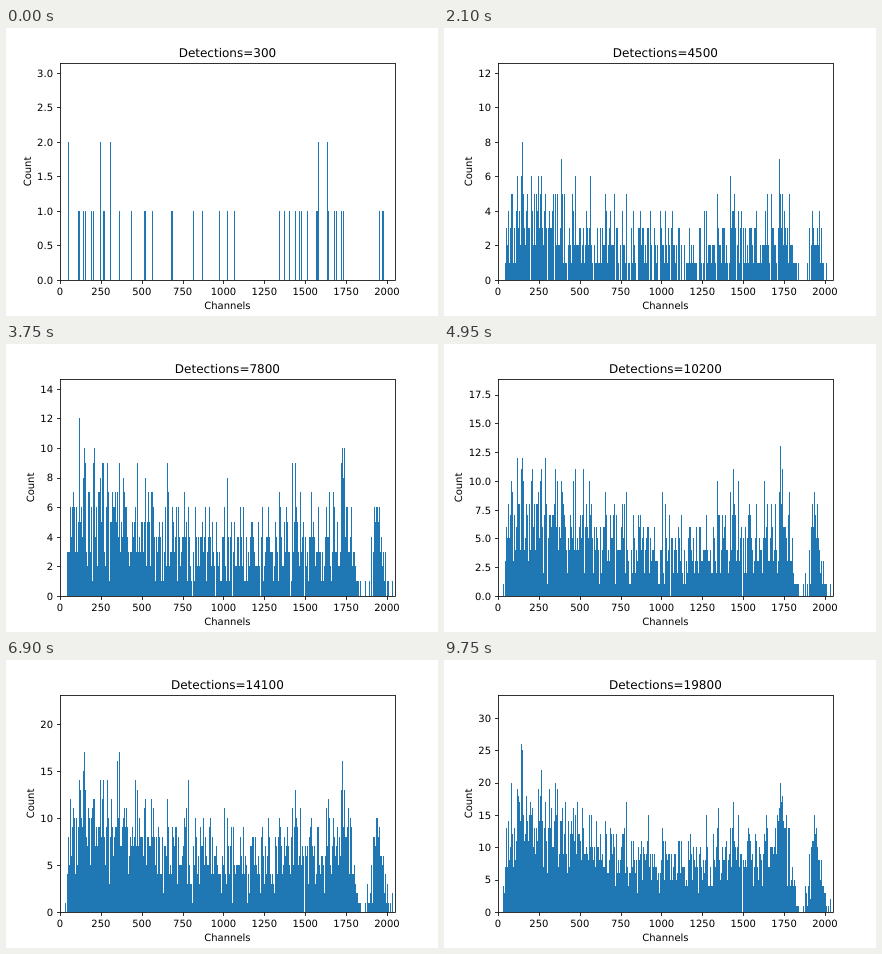
Write an HTML page that moves like this. It is 432 px wide and 288 px high and loops after 9900 ms.

```html
<!DOCTYPE html>
<html lang="en">
<head>
<meta charset="utf-8">
<title>Detections histogram</title>
<style>
  html, body { margin: 0; width: 100%; height: 100%; overflow: hidden; background: #fff; }
  svg { display: block; width: 432px; height: 288px; }
  text { font-family: "DejaVu Sans", sans-serif; font-size: 10px; text-rendering: geometricPrecision; }
  .mid { text-anchor: middle; }
  .end { text-anchor: end; }
  .line { fill: none; stroke: #000; stroke-width: .8; }
</style>
</head>
<body>
<svg viewBox="0 0 432 288">
  <rect width="432" height="288" fill="#fff"/>
  <path id="bars" fill="#1f77b4" shape-rendering="crispEdges"/>
  <rect class="line" x="54.5" y="35.5" width="335" height="217"/>
  <path id="ticks" class="line"/>
  <g id="xLabels"></g>
  <g id="yLabels"></g>
  <text class="mid" x="221.4" y="281">Channels</text>
  <text id="count" class="mid">Count</text>
  <text id="title" class="mid" x="221.4" y="29" style="font-size:12px"></text>
</svg>
<script>
const STEP = 150, STEPS = 66, BATCH = 300;
const LEFT = 54, COLUMNS = 335, WIDTH = 334.8, BASE = 252, HEIGHT = 217.44, CHANNELS = 2048;
const $ = id => document.getElementById(id);

// Tallest channel as [step, count]
const TOP = [[0, 3], [14, 12], [26, 14], [33, 18], [46, 22], [65, 32]];

function topAt(k) {
  const i = Math.max(1, TOP.findIndex(p => p[0] >= k));
  const [k0, n0] = TOP[i - 1], [k1, n1] = TOP[i];
  return Math.round(n0 + (n1 - n0) * (k - k0) / (k1 - k0));
}

const clamp = v => Math.min(1, Math.max(0, v));
const bump = (c, centre, width) => Math.exp(-(((c - centre) / width) ** 2));

// Expected final count: a broad continuum with peaks, cut off at both ends
function spectrum(c) {
  const body = 7 + 6 * bump(c, 300, 350) + 7 * bump(c, 147, 12)
    + 3 * bump(c, 1450, 90) + 9 * bump(c, 1735, 40);
  const fall = 1 / (1 + Math.exp((c - 1800) / 12));
  return clamp((c - 25) / 30) * (body * fall + 11 * bump(c, 1940, 42) + 0.8);
}

let seed = 20417;
function random() {
  seed = (seed + 0x6D2B79F5) | 0;
  let t = Math.imul(seed ^ (seed >>> 15), 1 | seed);
  t = (t + Math.imul(t ^ (t >>> 7), 61 | t)) ^ t;
  return ((t ^ (t >>> 14)) >>> 0) / 4294967296;
}

// Steps at which one column gains a count
function makeHits(mean) {
  const hits = [];
  const gap = () => -Math.log(1 - random()) * STEPS / mean;
  for (let t = gap(); t < STEPS; t += gap()) hits.push(Math.floor(t));
  return hits;
}

const columns = Array.from({ length: COLUMNS },
  (_, i) => makeHits(spectrum((i + 0.5) * CHANNELS / WIDTH)));

function label(cls, x, y, text) {
  return `<text class="${cls}" x="${x}" y="${y}">${text}</text>`;
}

let xTicks = "", xText = "";
for (let c = 0; c <= 2000; c += 250) {
  const x = LEFT + WIDTH * c / CHANNELS;
  xTicks += `M${Math.round(x) + 0.5} 252.5v3.5`;
  xText += label("mid", x.toFixed(2), 267, c);
}
$("xLabels").innerHTML = xText;

function draw(k) {
  const top = topAt(k), max = top * 1.05;
  const yOf = n => BASE - HEIGHT * n / max;

  let bars = "";
  columns.forEach((hits, i) => {
    const n = Math.min(hits.filter(h => h <= k).length, top);
    if (n) bars += `M${LEFT + i} ${BASE}V${Math.round(yOf(n))}h1V${BASE}z`;
  });
  $("bars").setAttribute("d", bars);

  const step = [0.5, 1, 2, 2.5, 5].find(s => s >= max / 9);
  const digits = step % 1 ? 1 : 0;
  let ticks = xTicks, text = "", widest = 0;
  for (let v = 0; v <= max; v += step) {
    const y = yOf(v), s = v.toFixed(digits);
    ticks += `M54.5 ${Math.round(y) + 0.5}h-3.5`;
    text += label("end", 47, Math.round(y + 3.8), s);
    widest = Math.max(widest, 6.36 * (s.length - digits) + 3.18 * digits);
  }
  $("ticks").setAttribute("d", ticks);
  $("yLabels").innerHTML = text;
  $("count").setAttribute("transform", `translate(${Math.round(40.6 - widest)} 143.5) rotate(-90)`);
  $("title").textContent = "Detections=" + BATCH * (k + 1);
}

let shown = -1;
const begin = performance.now();
function tick() {
  const k = Math.floor((performance.now() - begin) / STEP) % STEPS;
  if (k !== shown) draw(shown = k);
  requestAnimationFrame(tick);
}
tick();
</script>
</body>
</html>
```
